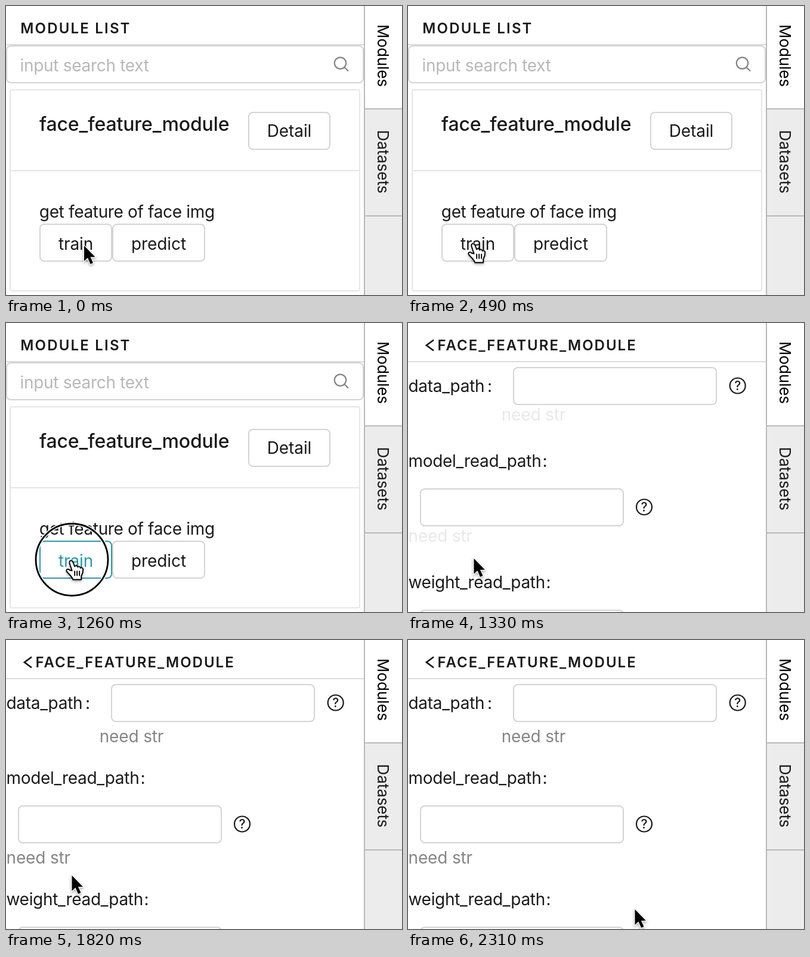
Write an HTML page that moves like this. It is 664 px wide and 486 px high and loops after 2.38 s.

```html
<!DOCTYPE html>
<html lang="en">
<head>
<meta charset="utf-8">
<title>Module list</title>
<style>
  html, body { margin: 0; width: 100%; height: 100%; overflow: hidden; background: #fff; }
  svg { display: block; width: 100%; height: 100%; }
  text { font: 28px Inter, sans-serif; letter-spacing: -.3px; fill: #1a1a1a; }
  .heading { font-size: 24px; font-weight: 600; letter-spacing: 2.2px; }
  .title { font-size: 32px; font-weight: 500; letter-spacing: -.12px; }
  .tab { font-size: 26px; letter-spacing: -.1px; }
  .button text { text-anchor: middle; letter-spacing: -.1px; }
  .placeholder { fill: #b8b8b8; }
  .colon { text-anchor: middle; }
  .hint { fill: #858585; letter-spacing: -.15px; }
  .box { fill: #fff; stroke: #d4d4d4; stroke-width: 2; }
  .card { fill: none; stroke: #e6e6e6; stroke-width: 2; }
  .rule { fill: none; stroke: #b9b9b9; stroke-width: 2; }
  .hover .box { stroke: #2f96a8; }
  .hover text { fill: #2f96a8; }
  .help circle { fill: none; stroke: #1a1a1a; stroke-width: 2.2; }
  .help text { font-size: 21px; font-weight: 500; text-anchor: middle; letter-spacing: 0; }
  .cursor { filter: drop-shadow(0 2px 2px rgba(0, 0, 0, .35)); }
</style>
</head>
<body>
<svg viewBox="0 0 664 486">
  <rect width="664" height="486" fill="#fff"/>
  <path d="M0 65H600" stroke="#dcdcdc" stroke-width="2"/>

  <g id="list">
    <text class="heading" x="24.200" y="46">MODULE LIST</text>
    <rect class="box" x="1" y="67" width="598" height="62" rx="7"/>
    <text class="placeholder" x="23.500" y="110">input search text</text>
    <g fill="none" stroke="#858585" stroke-width="2.2">
      <circle cx="560.5" cy="96" r="9.7"/>
      <path d="M567.5 103L574 109.500"/>
    </g>
    <rect class="card" x="7" y="141" width="586" height="338" rx="3"/>
    <path class="card" d="M7 277H593"/>
    <text class="title" x="56" y="210">face_feature_module</text>
    <text x="55.800" y="356" style="letter-spacing:-.34px">get feature of face img</text>
    <g class="button">
      <rect class="box" x="407" y="179" width="136" height="62" rx="7"/>
      <text x="475" y="220">Detail</text>
    </g>
    <g class="button">
      <rect class="box" x="179" y="367" width="154" height="62" rx="7"/>
      <text x="256" y="410">predict</text>
    </g>
    <g class="button" id="train">
      <rect class="box" x="57" y="367" width="120" height="62" rx="7"/>
      <text x="117" y="410">train</text>
    </g>
  </g>

  <g id="form">
    <path d="M43 28.500L31 37.500L43 46.500" fill="none" stroke="#1a1a1a" stroke-width="2.8"/>
    <text class="heading" x="49.500" y="46" style="letter-spacing:2px">FACE_FEATURE_MODULE</text>
    <text x="0.500" y="116">data_path</text>
    <text class="colon" x="137" y="116">:</text>
    <text x="0.500" y="242">model_read_path</text>
    <text class="colon" x="229.500" y="242">:</text>
    <text x="0.500" y="446">weight_read_path</text>
    <text class="colon" x="235.500" y="446">:</text>
    <rect class="box" x="177" y="75" width="340" height="62" rx="7"/>
    <rect class="box" x="21" y="279" width="340" height="62" rx="7"/>
    <rect class="box" x="21" y="483" width="340" height="62" rx="7"/>
    <g class="help" transform="translate(552.7 105.5)">
      <circle r="13"/><text y="7.500">?</text>
    </g>
    <g class="help" transform="translate(396 309.5)">
      <circle r="13"/><text y="7.500">?</text>
    </g>
    <g id="hints">
      <text class="hint" x="156.700" y="172">need str</text>
      <text class="hint" x="0.500" y="376">need str</text>
    </g>
  </g>

  <rect x="602" y="173" width="62" height="313" fill="#ececec"/>
  <path class="rule" d="M601 0V486M601 173H664M601 353H664"/>
  <text class="tab" transform="translate(623.3 31) rotate(90)" style="fill:#000">Modules</text>
  <text class="tab" transform="translate(623.3 208.5) rotate(90)">Datasets</text>

  <g id="ring" fill="none">
    <circle cx="110.500" cy="398" r="60.5" stroke="#fff" stroke-width="6"/>
    <circle cx="110.500" cy="398" r="60.5" stroke="#000" stroke-width="2.8"/>
  </g>
  <g id="arrow"><path class="cursor" d="M0 0V26L6 20.500L10.500 31L15 29L10.500 19H18.500Z"
    fill="#000" stroke="#fff" stroke-width="2.4" paint-order="stroke"/></g>
  <g id="hand"><g class="cursor" stroke="#000" stroke-width="1.9" stroke-linejoin="round" stroke-linecap="round">
    <path fill="#fff" d="M11 19L7 7C5.500 2 10.500 0 12.500 4.500L15.500 12C17 10 20 10 20.500 13C22 11 25 12 25 14.500C27 13 29.500 14 29.500 17C29.500 23 28 25 26.500 28V34H12.500C11 29 6 25 2.500 21C0 17 4 15 7 18Z"/>
    <path fill="none" d="M15.500 20V27M19.500 20V27M23.500 20V27"/>
  </g></g>
</svg>
<script>
  const LOOP = 2380, STEP = 70, FORM_AT = 1330;
  const el = id => document.getElementById(id);
  const show = (id, visible) => el(id).style.display = visible ? '' : 'none';
  const move = (id, x, y) => el(id).setAttribute('transform', `translate(${x} ${y})`);
  const within = (t, from, to) => t >= from && t < to;
  const progress = (t, from, to) => Math.min(1, Math.max(0, (t - from) / (to - from)));
  const smooth = p => p * p * (3 - 2 * p);
  const mix = (a, b, p) => a + (b - a) * p;

  function draw(now) {
    const t = Math.floor(now % LOOP / STEP) * STEP;
    const formOpen = t >= FORM_AT;
    const handShown = within(t, STEP, FORM_AT);

    show('list', !formOpen);
    show('form', formOpen);
    el('train').classList.toggle('hover', t >= 1260);
    show('ring', within(t, 210, 420) || within(t, 1190, FORM_AT));

    const reveal = progress(t, FORM_AT, 1470);
    move('hints', 0, -8 * (1 - reveal));
    el('hints').style.opacity = mix(.18, 1, reveal);

    const approach = smooth(progress(t, 0, 210));
    move('hand', mix(121, 99.7, approach), mix(402, 397.5, approach));
    show('hand', handShown);

    const leave = smooth(progress(t, 1960, 2310));
    if (formOpen) move('arrow', mix(110.5, 380.5, leave), mix(396, 453, leave));
    else move('arrow', 131, 403);
    show('arrow', !handShown);
  }

  const start = performance.now();
  function tick() {
    draw(performance.now() - start);
    requestAnimationFrame(tick);
  }
  tick();
</script>
</body>
</html>
```
